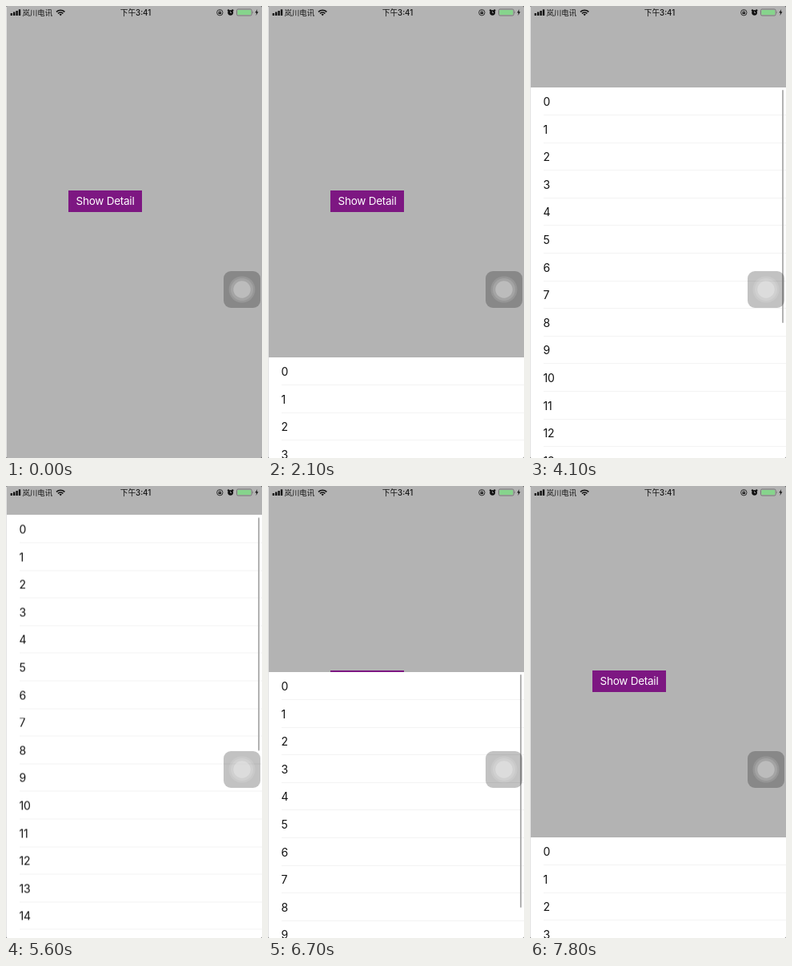
An HTML page for the animation above (8000 ms loop, 320 by 566 pixels).

```html
<!DOCTYPE html>
<html lang="zh">
<head>
<meta charset="utf-8">
<title>Pull-up sheet</title>
<style>
  html, body { margin: 0; width: 100%; height: 100%; overflow: hidden; background: #4a4a4a; }
  #stage {
    position: relative; width: 320px; height: 566px; overflow: hidden;
    background: #b3b3b3; border-radius: 2px;
    font-family: Inter, "Noto Sans CJK SC", "Noto Sans CJK", sans-serif;
  }
  #stage > * { position: absolute; }
  #button {
    left: 78px; top: 231px; width: 92px; height: 26.5px;
    background: #7d1782; color: #fff; text-align: center;
    font-size: 13.5px; line-height: 26px; letter-spacing: -.25px; white-space: nowrap;
  }
  #sheet { left: 1px; top: 0; width: 319px; background: #fff; will-change: transform; }
  .row {
    position: relative; height: 34.6px; padding-left: 15.5px;
    font-size: 14px; line-height: 35px; letter-spacing: -.2px; color: #111;
  }
  .row::after {
    content: ""; position: absolute; left: 16px; right: 0; bottom: -.4px;
    height: 1px; background: #f3f3f3;
  }
  #bar {
    position: absolute; left: 314px; top: 3px; width: 2px; height: 292px;
    border-radius: 1px; background: #b2b2b2;
  }
  #edge { left: 0; top: 0; width: 1px; height: 566px; background: #e2e2e2; }
  #overlay { left: 0; top: 0; }
</style>
</head>
<body>
<div id="stage">
  <div id="button">Show Detail</div>
  <div id="sheet"><div id="bar"></div></div>
  <div id="edge"></div>
  <svg id="overlay" width="320" height="566" viewBox="0 0 320 566">
    <!-- signal -->
    <path d="M5.6 9h2.4v3h-2.4zM9 7.5h2.4v4.5h-2.4zM12.4 6h2.4v6h-2.4zM15.8 4.2h2.4v7.8h-2.4z" fill="#111"/>
    <text x="20.5" y="11.8" font-size="9.4" fill="#111">岚川电讯</text>
    <!-- wifi -->
    <g fill="none" stroke="#111" stroke-width="1.6">
      <path d="M63 7.4a7.4 7.4 0 0 1 10.4 0"/>
      <path d="M65 9.4a4.6 4.6 0 0 1 6.4 0"/>
    </g>
    <path d="M66.5 10.6a2.6 2.6 0 0 1 3.4 0l-1.7 1.7z" fill="#111"/>
    <text x="162" y="11.7" font-size="9.7" font-weight="500" text-anchor="middle" fill="#111">下午3:41</text>
    <!-- rotation lock -->
    <g fill="none" stroke="#222">
      <circle cx="267.3" cy="8.2" r="3.7" stroke-width=".9"/>
      <path d="M266.2 8v-.8a1.1 1.1 0 0 1 2.2 0v.8" stroke-width=".7"/>
    </g>
    <rect x="265.5" y="7.7" width="3.6" height="2.4" fill="#222"/>
    <!-- alarm -->
    <g fill="#111">
      <circle cx="280.6" cy="8.3" r="3.4"/>
      <circle cx="278" cy="5.5" r="1.2"/>
      <circle cx="283.2" cy="5.5" r="1.2"/>
    </g>
    <path d="M280.6 6.5v2h1.5" fill="none" stroke="#b3b3b3" stroke-width=".8"/>
    <!-- battery -->
    <rect x="288.5" y="4" width="18.6" height="8" rx="1.6" fill="#b3b3b3" stroke="#666" stroke-width=".8"/>
    <rect x="289.4" y="4.9" width="16.8" height="6.2" rx=".8" fill="#86d48c"/>
    <path d="M308 6.6q1.4 1.4 0 2.8z" fill="#666"/>
    <path d="M314.2 4l-2.9 4.6h1.9l-.8 3.5 3-4.8h-1.9z" fill="#111"/>
    <!-- floating touch button -->
    <rect x="272" y="332" width="46" height="46" rx="9" fill-opacity=".238"/>
    <g fill="#fff">
      <circle cx="295" cy="355" r="16.5" fill-opacity=".12"/>
      <circle cx="295" cy="355" r="14" fill-opacity=".13"/>
      <circle cx="295" cy="355" r="10.7" fill-opacity=".27"/>
    </g>
  </svg>
</div>
<script>
  const LOOP = 8000, STEP = 100, ROWS = 24, HIDDEN = 566;

  const linear = p => p;
  const easeIn = p => p * p;
  const easeOut = p => 1 - (1 - p) ** 2;

  // Each drag or snap moves the sheet's top edge on from where it last rested.
  const moves = [
    { from: 1200, to: 1600, top: 440, ease: easeOut },
    { from: 2200, to: 2700, top: 240, ease: linear },
    { from: 2800, to: 3200, top: 186, ease: easeOut },
    { from: 3400, to: 4300, top: 78, ease: linear },
    { from: 4300, to: 4700, top: 17, ease: easeOut },
    { from: 5300, to: 6000, top: 123, ease: easeIn },
    { from: 6100, to: 6700, top: 233, ease: linear },
    { from: 6800, to: 7300, top: 330, ease: linear },
    { from: 7400, to: 7800, top: 440, ease: easeOut }
  ];

  function sheetTop(t) {
    let y = HIDDEN;
    for (const { from, to, top, ease } of moves) {
      const p = Math.min(1, Math.max(0, (t - from) / (to - from)));
      y += (top - y) * ease(p);
    }
    return y;
  }

  // The scroll indicator stays on while the list is being handled.
  const handled = t => t > 3400 && t < 7500;

  const sheet = document.getElementById("sheet");
  const bar = document.getElementById("bar");

  for (let i = 0; i < ROWS; i++) {
    const row = document.createElement("div");
    row.className = "row";
    row.textContent = i;
    sheet.insertBefore(row, bar);
  }

  const start = performance.now();

  function draw() {
    const elapsed = (performance.now() - start) % LOOP;
    const t = Math.floor(elapsed / STEP) * STEP;
    sheet.style.transform = `translateY(${sheetTop(t)}px)`;
    bar.style.opacity = handled(t) ? 1 : 0;
    requestAnimationFrame(draw);
  }
  draw();
</script>
</body>
</html>
```
